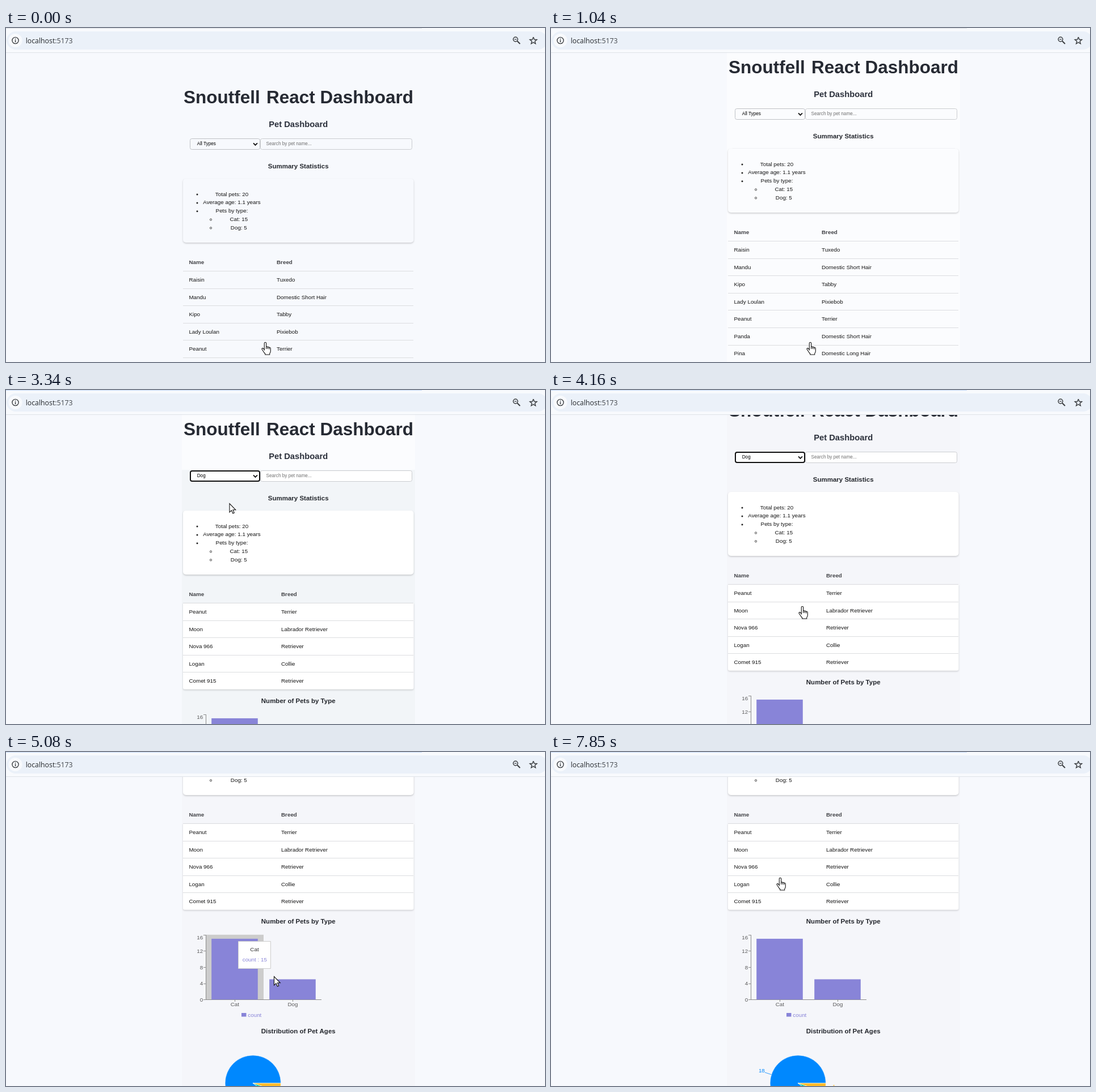
Write an HTML page with a canvas that moves like this. It is 950x590 px and loops after 8000 ms.

```html
<!DOCTYPE html>
<html lang="en">
<head>
<meta charset="utf-8">
<title>Pet Dashboard</title>
<style>
html, body { margin: 0; width: 100%; height: 100%; overflow: hidden; background: #f7f9fd; }
canvas { display: block; width: 950px; height: 590px; }
</style>
</head>
<body>
<canvas id="stage"></canvas>
<script>
const W = 950, H = 590, LOOP = 8000;
const canvas = document.getElementById('stage');
const c = canvas.getContext('2d');
const dpr = window.devicePixelRatio || 1;
canvas.width = W * dpr;
canvas.height = H * dpr;

const SANS = '"Liberation Sans", Arial, sans-serif';
const EM = 9.84;
const BG = '#f7f9fd', PURPLE = '#8884d8';

// Timelines: [start ms, values...]; the last entry already started is in force.
const SCROLL = [[0, -53], [640, -26], [910, -8], [1040, 0], [4160, 33], [4290, 97],
  [4410, 172], [4540, 195], [4670, 228], [4810, 250]];
const CURSOR = [[0, 'hand', 457, 555], [1190, 'arrow', 429, 244], [1330, 'arrow', 429, 192],
  [1470, 'arrow', 425, 160], [1590, 'arrow', 427, 145], [2420, 'arrow', 410, 180],
  [2550, 'arrow', 394, 200], [3770, 'hand', 443, 382], [4410, 'arrow', 443, 383],
  [5080, 'arrow', 472.5, 396], [5210, 'arrow', 483, 400], [5460, 'arrow', 490, 402],
  [5980, 'arrow', 514, 400], [6130, 'arrow', 450, 398], [6260, 'arrow', 400.5, 395],
  [6900, 'arrow', 402, 310], [7020, 'hand', 404, 237], [7160, 'hand', 403, 169],
  [7310, 'hand', 408, 152], [7440, 'hand', 409, 148], [7720, 'hand', 406, 190],
  [7850, 'hand', 404, 222]];
const TIP = [[0, -1], [4410, 0, 375, 576], [4540, 0, 394, 581], [4670, 0, 404, 583],
  [4810, 0, 409, 584], [5210, 1, 422, 589], [5340, 1, 434, 595], [5460, 1, 441, 598],
  [6130, 0, 431, 597], [6260, 0, 419, 595], [6390, 0, 411, 592], [6520, 0, 409, 591],
  [6900, -1]];
const THEME = [[0, 0], [640, 1], [3210, 2], [4160, 3]];
const HOVER = [[0, -1], [1990, 0], [2420, 1], [2550, 2], [3210, -1]];
const PANEL = [BG, '#fbfcfe', '#f2f5f8', '#f5f6fa'];

const OPTIONS = ['All Types', 'Cat', 'Dog', 'Rabbit', 'Bird', 'Horse', 'Other'];
const ALL_PETS = [['Raisin', 'Tuxedo'], ['Mandu', 'Domestic Short Hair'], ['Kipo', 'Tabby'],
  ['Lady Loulan', 'Pixiebob'], ['Peanut', 'Terrier'], ['Panda', 'Domestic Short Hair'],
  ['Pina', 'Domestic Long Hair']];
const DOGS = [['Peanut', 'Terrier'], ['Moon', 'Labrador Retriever'], ['Nova 966', 'Retriever'],
  ['Logan', 'Collie'], ['Comet 915', 'Retriever']];
const COUNTS = [['Cat', 15], ['Dog', 5]];
const AGES = [[18, '#0088fe'], [1, '#00c49f'], [1, '#ffbb28']];

const ARROW = new Path2D('M.5.5V16L4 12.7L6.4 18L8.8 17L6.5 11.8H11.3Z');
const HAND = new Path2D('M5 13.5V2a1.7 1.7 0 0 1 3.4 0V8.5Q9.6 7 11 8.6Q12.5 7.7 13.6 9.4' +
  'Q16 8.8 16 11.5V16Q16 18 14.4 20V22H6.5V20.5Q4.5 18.5 3 15.8L.8 12.5Q.3 10.5 2.2 10.6Q3.6 11 5 13.5Z');
const FINGERS = new Path2D('M8.4 8.5v3.5M11 8.6v3.4M13.6 9.4v3');

function at(steps, t) {
  let now = steps[0];
  for (const s of steps) if (s[0] <= t) now = s;
  return now.slice(1);
}

// Centres capitals on mid, with the baseline on a whole pixel.
function text(s, x, mid, { size = EM, bold = false, color = '#161616', align = 'left', font = SANS } = {}) {
  c.font = (bold ? 'bold ' : '') + size + 'px ' + font;
  c.fillStyle = color;
  c.textAlign = align;
  c.fillText(s, x, Math.floor(mid + size * 0.358));
}

function heading(s, mid) {
  text(s, 515.2, mid, { size: 11.5, bold: true, color: '#24272d', align: 'center' });
}

function rect(x, y, w, h, color) {
  c.fillStyle = color;
  c.fillRect(x, y, w, h);
}

function hline(x, y, w, color) { rect(x, Math.round(y), w, 1, color); }

function box(x, y, w, h, r, fill, stroke, width = 1) {
  c.beginPath();
  c.roundRect(x, y, w, h, r);
  if (fill) { c.fillStyle = fill; c.fill(); }
  if (stroke) { c.strokeStyle = stroke; c.lineWidth = width; c.stroke(); }
}

function shadowBox(x, y, w, h, r, fill, alpha) {
  c.save();
  c.shadowColor = `rgba(0,0,0,${alpha})`;
  c.shadowBlur = 3 * dpr;
  c.shadowOffsetY = 1.4 * dpr;
  box(x, y, w, h, r, fill);
  c.restore();
}

function line(points, color, width) {
  c.beginPath();
  points.forEach(([x, y]) => c.lineTo(x, y));
  c.strokeStyle = color;
  c.lineWidth = width;
  c.stroke();
}

function ring(x, y, r, color, width) {
  c.beginPath();
  c.arc(x, y, r, 0, 7);
  c.strokeStyle = color;
  c.lineWidth = width;
  c.stroke();
}

function disc(x, y, r, color) {
  c.beginPath();
  c.arc(x, y, r, 0, 7);
  c.fillStyle = color;
  c.fill();
}

function drawBrowserBar(loaded) {
  const ink = '#3a3d40';
  const url = { size: 12.3, color: '#25282b', font: '"Open Sans", "Noto Sans", sans-serif' };
  rect(0, 0, W, 44, '#f8fafd');
  rect(0, 0, 733, 1, loaded ? '#c9dcfa' : '#dee1e6');
  box(1, 6, 953, 32, 16, '#ebf1f9');
  disc(16.5, 22, 12, '#f8fafd');
  ring(16.5, 22, 5.6, ink, 1.4);
  rect(15.8, 21.2, 1.5, 4, ink);
  rect(15.8, 18.7, 1.5, 1.5, ink);
  text('localhost', 34.7, 22.7, url);
  const w = c.measureText('localhost').width;
  text(':5173', 34.7 + w, 22.7, { ...url, color: '#43474c' });
  ring(898, 20, 3.9, ink, 1.5);
  line([[901, 23], [906, 28]], ink, 1.9);
  line([[896, 20], [900, 20]], ink, 1.2);
  const star = [];
  for (let i = 0; i <= 10; i++) {
    const a = -Math.PI / 2 + i * Math.PI / 5, r = i % 2 ? 2.8 : 6.5;
    star.push([929.5 + r * Math.cos(a), 22.5 + r * Math.sin(a)]);
  }
  line(star, ink, 1.4);
  hline(0, 43, W, '#dfe3e8');
}

function drawHeader(theme, focused) {
  const fill = theme > 1 ? '#fff' : PANEL[theme];
  const title = { size: 31.5, bold: true, color: '#262a33' };
  text('Snoutfell', 313, 69, title);
  text('React Dashboard', 718, 69, { ...title, align: 'right' });
  text('Pet Dashboard', 515.2, 117, { size: 14.76, bold: true, color: '#2b303b', align: 'center' });
  box(448.5, 142.5, 267, 19, 3, fill, '#cbcdd0');
  text('Search by pet name...', 458.5, 152, { size: 8.2, color: '#707070' });
  if (focused) box(325, 143, 122, 18, 3, fill, '#101010', 2);
  else box(324.5, 142.5, 123, 19, 3, fill, '#bfc1c5');
  text(theme > 1 ? 'Dog' : 'All Types', 336.7, 152, { size: 8.2, color: '#000' });
  line([[436, 150.4], [439.5, 154], [443, 150.4]], '#111', 1.8);
}

function drawSummary(theme) {
  heading('Summary Statistics', 191.3);
  shadowBox(312, 213, 406.5, 113, 5, theme > 1 ? '#fff' : PANEL[theme], 0.19);
  if (theme === 1) hline(320, 212, 392, '#f0f1f4');
  const items = [['Total pets: 20', 0], ['Average age: 1.1 years', 0], ['Pets by type:', 0],
    ['Cat: 15', 1], ['Dog: 5', 1]];
  items.forEach(([s, nested], i) => {
    const y = 240.5 + i * 14.8;
    text(s, nested ? 410.3 : 398, y, { align: 'center' });
    if (nested) ring(361, y + 0.6, 1.6, '#333', 0.9);
    else disc(337, y + 0.6, 1.5, '#222');
  });
}

function drawTable(filtered) {
  const rows = filtered ? DOGS : ALL_PETS, col = filtered ? 485 : 477;
  const pitch = 30.55, top = 376.2, head = { bold: true, color: '#434448' };
  if (filtered) shadowBox(312, 376, 406.5, pitch * rows.length, [0, 0, 3, 3], '#fff', 0.16);
  text('Name', 322.4, 361.3, head);
  text('Breed', col, 361.3, head);
  rows.forEach(([name, breed], i) => {
    const y = top + i * pitch;
    hline(312, y, 406, '#dcdde0');
    text(name, 322.4, y + 15.8);
    text(breed, col, y + 15.8);
  });
}

function drawBars(hover) {
  const x0 = 352, y0 = 687.3, band = 102, unit = 7.16, axis = '#8b8b8b';
  const top = y0 - 16 * unit;
  heading('Number of Pets by Type', 549.3);
  if (hover >= 0) rect(x0 + hover * band, top, band, y0 - top, '#ccc');
  hline(x0, y0, 204, axis);
  rect(x0, Math.round(top), 1, Math.round(y0) - Math.round(top), axis);
  for (let v = 0; v <= 16; v += 4) {
    const y = y0 - v * unit;
    hline(x0 - 4, y, 4, axis);
    text(v, 347.3, v === 16 ? y + 4.8 : y + 0.7, { color: '#5c5c5c', align: 'right' });
  }
  COUNTS.forEach(([name, n], i) => {
    const x = x0 + i * band;
    rect(x + 10.2, y0 - n * unit, 81.6, n * unit, PURPLE);
    rect(x + band / 2, Math.round(y0), 1, 4, axis);
    text(name, x + band / 2 + 0.4, 696.2, { color: '#5c5c5c', align: 'center' });
  });
  rect(415, 711, 8.5, 6.5, PURPLE);
  text('count', 426.3, 714.6, { color: PURPLE });
}

function drawPie(labels) {
  const cx = 435.3, cy = 835, r = 49.2, edge = 61.5;
  heading('Distribution of Pet Ages', 743.3);
  let a = 0;
  for (const [n, color] of AGES) {
    const b = a - n / 20 * 2 * Math.PI, m = (a + b) / 2;
    c.beginPath();
    c.moveTo(cx, cy);
    c.arc(cx, cy, r, a, b, true);
    c.closePath();
    c.fillStyle = color;
    c.fill();
    c.strokeStyle = '#fff';
    c.lineWidth = 0.6;
    c.stroke();
    if (labels) {
      const dx = Math.cos(m), dy = Math.sin(m), x = cx + edge * dx, y = cy + edge * dy;
      line([[cx + r * dx, cy + r * dy], [x, y]], color, 0.8);
      text(n, x, y - 3.2, { color, align: dx < 0 ? 'right' : 'left' });
    }
    a = b;
  }
}

function drawTip([kind, x, y]) {
  if (kind < 0) return;
  const [name, n] = COUNTS[kind];
  box(x + 0.5, y + 0.5, 57, 48, 0, '#fff', '#ccc');
  text(name, x + 29, y + 15, { color: '#333', align: 'center' });
  text('count : ' + n, x + 29.3, y + 32.7, { color: PURPLE, align: 'center' });
}

function drawMenu(hover) {
  if (hover < 0) return;
  box(325.5, 162.5, 121, 112, 0, '#fff', '#777');
  OPTIONS.forEach((s, i) => {
    const y = 163 + i * 16;
    if (i === hover) rect(326, y, 120, 16, '#1967d2');
    text(s, 336.7, y + 8.2, { size: 8.2, color: i === hover ? '#fff' : '#000' });
  });
}

function drawCursor([kind, x, y]) {
  const hand = kind === 'hand', path = hand ? HAND : ARROW;
  c.save();
  c.translate(hand ? x - 6.7 : x - 0.5, y);
  c.fillStyle = '#fff';
  c.strokeStyle = '#111';
  c.lineWidth = 1.1;
  c.fill(path);
  c.stroke(path);
  if (hand) c.stroke(FINGERS);
  c.restore();
}

function draw(t) {
  const [theme] = at(THEME, t), [scroll] = at(SCROLL, t), tip = at(TIP, t);
  c.setTransform(dpr, 0, 0, dpr, 0, 0);
  rect(0, 0, W, H, BG);
  if (theme) rect(310, 44, 411, H - 44, PANEL[theme]);
  if (theme === 2) rect(310, 44, 411, 97, PANEL[1]);
  c.save();
  c.beginPath();
  c.rect(0, 44, W, H - 44);
  c.clip();
  c.translate(0, -scroll);
  drawHeader(theme, t >= 1990);
  drawSummary(theme);
  drawTable(theme > 1);
  if (theme > 1) {
    drawBars(tip[0]);
    drawPie(t >= 5730);
    drawTip(tip);
  }
  c.restore();
  drawBrowserBar(t >= 1990);
  drawMenu(at(HOVER, t)[0]);
  drawCursor(at(CURSOR, t));
}

const start = performance.now();
function tick() {
  draw((performance.now() - start) % LOOP);
  requestAnimationFrame(tick);
}
tick();
</script>
</body>
</html>
```
